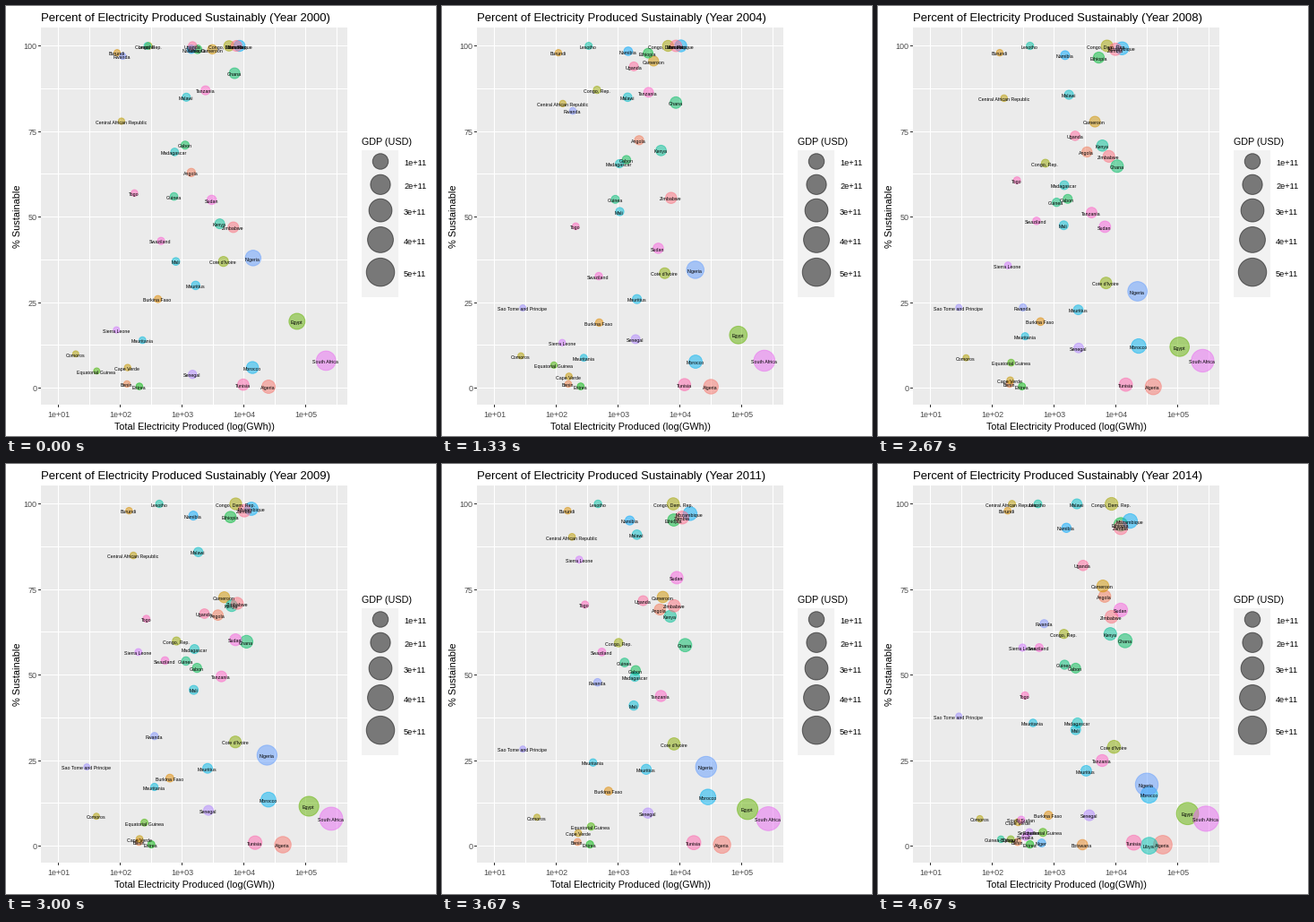
These frames come from a looping animation (480 px wide and 480 px high, 5000 ms). A matplotlib script:

```python
import math

import matplotlib.pyplot as plt
import numpy as np
from matplotlib.animation import FuncAnimation
from matplotlib.patches import Circle, Rectangle

SIZE, DPI = 480, 100
PX = 72 / DPI
FIRST_YEAR, YEARS = 2000, 15
LOOP_MS, INTERVAL = 5000, 40
LEFT, TOP, RIGHT, BOTTOM = 39, 24, 381, 445

plt.rcParams["font.family"] = "Liberation Sans"
fig = plt.figure(figsize=(SIZE / DPI, SIZE / DPI), dpi=DPI, facecolor="white")
ax = fig.add_axes([0, 0, 1, 1])
ax.set(xlim=(0, SIZE), ylim=(SIZE, 0))
ax.axis("off")


def x_of(log_gwh):
    return 58.5 + 69 * (log_gwh - 1)


def y_of(share):
    return 426.5 - 3.82 * share


def write(x, y, text, size, color="black", ha="left", va="baseline", **kwargs):
    return ax.text(x, y, text, fontsize=size * PX, color=color, ha=ha, va=va, **kwargs)


def rule(xs, ys, color):
    ax.plot(xs, ys, color=color, lw=PX, antialiased=False, snap=False,
            solid_capstyle="butt", zorder=1)


def box(x0, y0, x1, y1, color):
    return ax.add_patch(Rectangle((x0, y0), x1 - x0, y1 - y0, fc=color, lw=0, zorder=0))


def bubble(x, y, r, color):
    return ax.add_patch(Circle((x, y), r, fc=(*color, 0.5), ec=(*color, 0.5),
                               lw=PX, zorder=3))


def hcl(hue, chroma=100, lum=65):
    """Polar LUV to sRGB."""
    angle = math.radians(hue)
    y = ((lum + 16) / 116) ** 3
    u = chroma * math.cos(angle) / (13 * lum) + 0.1978
    v = chroma * math.sin(angle) / (13 * lum) + 0.4683
    x = 9 * y * u / (4 * v)
    z = y * (12 - 3 * u - 20 * v) / (4 * v)
    rgb = np.clip([3.2405 * x - 1.5371 * y - 0.4985 * z,
                   -0.9693 * x + 1.8760 * y + 0.0416 * z,
                   0.0556 * x - 0.2040 * y + 1.0572 * z], 0, 1)
    return tuple(np.where(rgb > 0.00304, 1.055 * rgb ** (1 / 2.4) - 0.055, 12.92 * rgb))


# Panel, grid and axes
panel = box(LEFT, TOP, RIGHT, BOTTOM, "#EBEBEB")
for i in range(10):
    x = math.floor(x_of(1 + i / 2)) + 0.5
    rule([x, x], [TOP, BOTTOM], "white")
    if i % 2 == 0:
        rule([x, x], [BOTTOM, BOTTOM + 3], "#333333")
        write(x, 458.7, f"1e+{i // 2 + 1:02d}", 9, "#4D4D4D", "center")
for i in range(9):
    y = math.floor(y_of(12.5 * i)) + 0.5
    rule([LEFT, RIGHT], [y, y], "white")
    if i % 2 == 0:
        rule([LEFT - 3, LEFT], [y, y], "#333333")
        write(34.5, y + 3.5, f"{i * 12.5:.0f}", 9, "#4D4D4D", "right")
title = write(LEFT, 17, "", 13.1)
write(210, 473.3, "Total Electricity Produced (log(GWh))", 10.8, ha="center")
write(13, 235, "% Sustainable", 11, ha="center", va="center", rotation=90)

# Legend: each key is as tall as its circle plus a margin
write(397, 155, "GDP (USD)", 10.7)
box(397, 161, 438, 325, "#F2F2F2")
y = 161
for gdp in range(1, 6):
    r = 3.1 + 5.66 * math.sqrt(gdp)
    half = max(12.5, 1.2 * r)
    y += half
    bubble(418, y, r, (0, 0, 0))
    write(444, y + 5, f"{gdp}e+11", 9.1)
    y += half

# Output doubles over the loop unless growth (in decades) says otherwise;
# shares are evenly spaced waypoints in time.
countries = []


def add(name, output, *shares, growth=0.3, since=FIRST_YEAR, wealth=1):
    countries.append((name, output, shares, growth, since, wealth))


add("Algeria", 4.4, 0.4, growth=0.36)
add("Angola", 3.15, 63, 74, 67, 73, growth=0.67)
add("Benin", 2.11, 1.2)
add("Botswana", 3.16, 0.4, since=2012)
add("Burkina Faso", 2.61, 26, 18, 20, 9)
add("Burundi", 1.95, 98)
add("Cameroon", 3.49, 99, 95, 71, 76)
add("Cape Verde", 2.12, 6, 3, 2, 7)
add("Central African Republic", 2.02, 78, 84, 85, 100)
add("Comoros", 1.28, 10, 8, growth=0.52)
add("Congo, Dem. Rep.", 3.76, 100, growth=0.17)
add("Congo, Rep.", 2.46, 100, 85, 58, 62, growth=0.7)
add("Cote d'Ivoire", 3.67, 37, 31, 29)
add("Djibouti", 2, 2, since=2013)
add("Egypt", 4.86, 19.5, 12.5, 9.5)
add("Equatorial Guinea", 1.62, 5, 8, 4, growth=1.2)
add("Eritrea", 2.31, 0.5)
add("Ethiopia", 3.25, 99, 97, 94, growth=0.83)
add("Gabon", 3.05, 71, 66, 51, 52)
add("Ghana", 3.85, 92, 82, 58, 60)
add("Guinea", 2.87, 56, 53)
add("Guinea-Bissau", 1.84, 2, since=2014)
add("Kenya", 3.61, 48, 73, 70, 62)
add("Lesotho", 2.44, 100)
add("Libya", 4.24, 0.1, since=2013)
add("Madagascar", 2.88, 69, 65, 57, 36, growth=0.5)
add("Malawi", 3.07, 85, 85, 86, 100)
add("Mali", 2.9, 37, 54, 45, 34, growth=0.45)
add("Mauritania", 2.36, 14, 8, 18, 36)
add("Mauritius", 3.22, 30, 23, 22)
add("Morocco", 4.14, 6, 8, 14, 15, growth=0.4)
add("Mozambique", 3.93, 100, 100, 95)
add("Namibia", 3.15, 99, 98, 93, growth=0.05)
add("Niger", 2.5, 0.9, since=2013)
add("Nigeria", 4.15, 38, 34, 26, 18, growth=0.35, wealth=1.6)
add("Rwanda", 2.04, 97, 92, 15, 45, 65, growth=0.8)
add("Sao Tome and Principe", 1.46, 14, 25, 23, 38, growth=0, since=2002)
add("Senegal", 3.17, 4, 16, 10, 9, growth=0.4)
add("Seychelles", 2.3, 4, since=2013)
add("Sierra Leone", 1.94, 17, 13, 15, 88, 58, growth=0.55)
add("Somalia", 2.24, 2.7, since=2013)
add("South Africa", 5.33, 8, growth=0.13)
add("South Sudan", 2.17, 7.7, since=2012)
add("Sudan", 3.48, 55, 42, 34, 80, 69, growth=0.6)
add("Swaziland", 2.66, 43, 31, 56, 58, growth=0.1)
add("Tanzania", 3.38, 87, 92, 53, 47, 25, growth=0.4)
add("Togo", 2.23, 57, 46, 55, 75, 44)
add("Tunisia", 3.99, 1)
add("Uganda", 3.17, 100, 93, 66, 82)
add("Zambia", 3.88, 100, 100, 93, growth=0.2)
add("Zimbabwe", 3.83, 47, 57, 72, 67, growth=0.1)


def radius(x, progress, wealth):
    """Richer economies produce more electricity, and all grow over time."""
    size = max(0, x - 60) / 305
    return 3.4 + 10.6 * wealth * (0.75 + 0.25 * progress) * size ** 2.5


marks = []
for i, (name, *_) in enumerate(countries):
    dot = bubble(0, 0, 1, hcl(15 + 360 * i / len(countries)))
    label = write(0, 0, name, 5.25, ha="center", zorder=4, clip_on=True)
    for artist in (dot, label):
        artist.set_clip_path(panel)
    marks.append((dot, label))


def update(frame):
    # The year turns on the tick nearest to its share of the loop.
    step = (frame * INTERVAL + 30) * YEARS // LOOP_MS
    progress = step / (YEARS - 1)
    title.set_text(f"Percent of Electricity Produced Sustainably (Year {FIRST_YEAR + step})")
    for (dot, label), (_, output, shares, growth, since, wealth) in zip(marks, countries):
        x = x_of(output + growth * progress)
        y = y_of(np.interp(progress, np.linspace(0, 1, len(shares)), shares))
        dot.center = x, y
        dot.radius = radius(x, progress, wealth)
        label.set_position((x - 0.5, y + 3.2))
        for artist in (dot, label):
            artist.set_visible(FIRST_YEAR + step >= since)
    return []


animation = FuncAnimation(fig, update, frames=LOOP_MS // INTERVAL, interval=INTERVAL,
                          repeat=True, repeat_delay=0)
plt.show()
```
